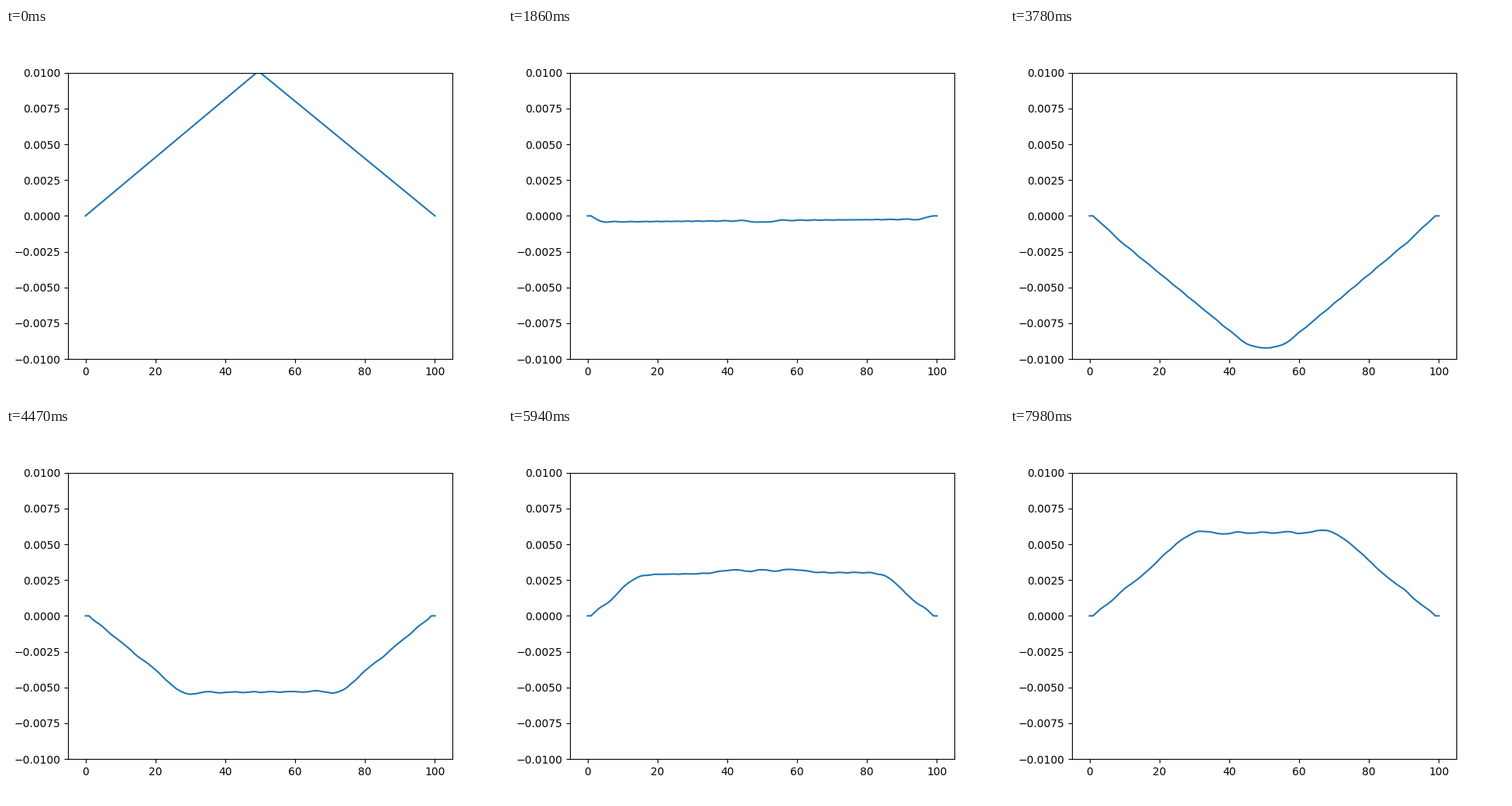
Recreate the animation shown at these times as a matplotlib script. Size 640 by 480 pixels, loop 8 s.

```python
import numpy as np
import matplotlib.pyplot as plt
from matplotlib.animation import FuncAnimation

LOOP_MS = 8000
FRAMES = 267
SPEED = 98 / 120  # grid points travelled per frame

x = np.arange(101)
pluck = np.concatenate([np.linspace(0, 0.01, 50), np.linspace(0.01, 0, 51)])

# Standing waves of a string clamped at points 1 and 99
cells = 98
order = np.arange(1, cells)
modes = np.sin(np.pi * np.outer(order, order) / cells)
omega = 2 * SPEED * np.sin(np.pi * order / (2 * cells))
weights = 2 / cells * modes @ pluck[2:99]


def shape(n):
    """Displacement of the plucked string after n frames."""
    if n == 0:
        return pluck
    y = np.zeros(x.size)
    y[2:99] = (weights * np.cos(omega * n)) @ modes
    return y


fig, ax = plt.subplots(figsize=(6.4, 4.8), dpi=100)
line, = ax.plot(x, pluck)
ax.set_ylim(-0.01, 0.01)


def update(n):
    line.set_ydata(shape(n))
    return line,


anim = FuncAnimation(fig, update, frames=FRAMES, interval=LOOP_MS / FRAMES,
                     repeat=True, repeat_delay=0)
plt.show()
```
